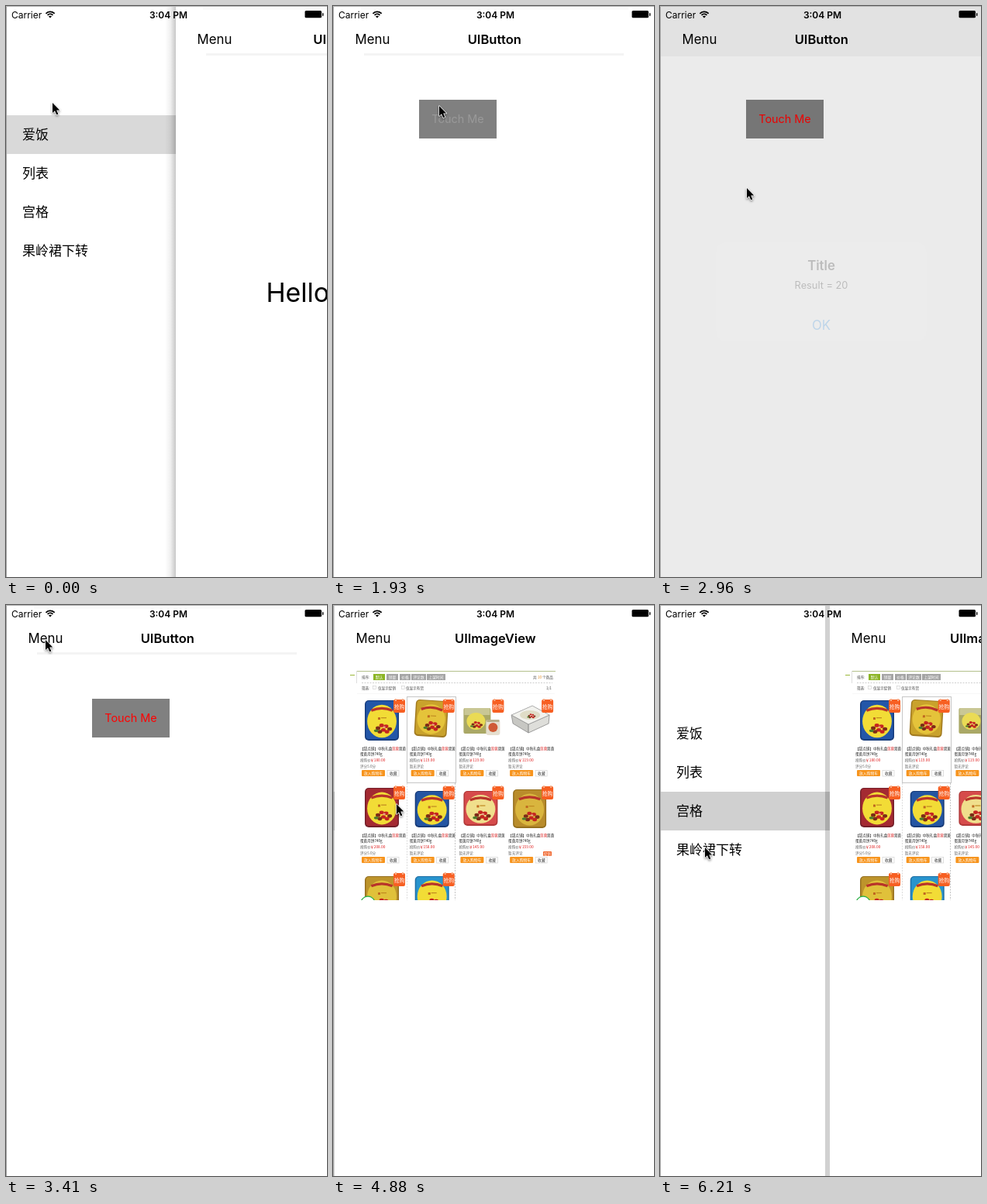
These frames come from a looping animation (414 px wide and 737 px high, 6350 ms). An HTML page with a canvas:

```html
<!DOCTYPE html>
<html lang="en">
<head>
<meta charset="utf-8">
<title>Drawer demo</title>
<style>
html, body { margin: 0; width: 100%; height: 100%; overflow: hidden; background: #fff; }
canvas { display: block; width: 414px; height: 737px; }
</style>
</head>
<body>
<canvas id="stage" width="414" height="737"></canvas>
<script>
const W = 414, H = 737, LOOP = 6350, STEP = 147.9, OPEN = 218;
const ctx = document.getElementById('stage').getContext('2d');
const LATIN = 'Inter, sans-serif';
const CJK = '"Noto Sans CJK SC", "Noto Sans CJK", sans-serif';

// Key points are [step, value...]
const CURSOR = [[0, 60, 125], [3, 76, 212], [7, 80, 216], [12, 135, 132], [13, 137, 129],
  [15, 150, 153], [17, 203, 400], [18, 208, 410], [20, 112, 235], [22, 52, 46], [24, 50, 44],
  [28, 80, 235], [29, 82, 257], [33, 82, 257], [36, 52, 46], [38, 50, 44], [41, 59, 290], [42, 58, 313]];
const DIM = [[13, 0], [14, .25], [15, .4], [18, .4], [19, .22], [20, .08], [21, 0]];
const TITLES = ['UILabel', 'UIButton', 'UIImageView'];
const MENU = ['爱饭', '列表', '宫格', '果岭裙下转'];

function sample(keys, k) {
  if (k <= keys[0][0]) return keys[0].slice(1);
  for (let i = 1; i < keys.length; i++) {
    const a = keys[i - 1], b = keys[i];
    if (k <= b[0]) {
      const u = (k - a[0]) / (b[0] - a[0]);
      return a.slice(1).map((v, j) => v + (b[j + 1] - v) * u);
    }
  }
  return keys[keys.length - 1].slice(1);
}

function drawerOffset(k) {
  const decay = from => OPEN * Math.exp(-1.75 * (k - from));
  if (k < 4) return OPEN;
  if (k < 23) return Math.round(decay(4));
  if (k < 30) return Math.round(OPEN - decay(23));
  if (k < 38) return Math.round(decay(30));
  return Math.round(OPEN - decay(38));
}

function rect(x, y, w, h, color) {
  ctx.fillStyle = color;
  ctx.fillRect(x, y, w, h);
}

function round(x, y, w, h, r, color) {
  ctx.fillStyle = color;
  ctx.beginPath();
  ctx.roundRect(x, y, w, h, r);
  ctx.fill();
}

function ellipse(x, y, rx, ry, color) {
  ctx.fillStyle = color;
  ctx.beginPath();
  ctx.ellipse(x, y, rx, ry, 0, 0, 7);
  ctx.fill();
}

function poly(points, color, line) {
  ctx.beginPath();
  points.forEach(p => ctx.lineTo(p[0], p[1]));
  ctx.closePath();
  ctx.fillStyle = color;
  ctx.fill();
  if (line) { ctx.strokeStyle = line; ctx.stroke(); }
}

function text(str, x, y, size, color = '#000', { weight = 400, align = 'left', font = LATIN } = {}) {
  ctx.font = `${weight} ${size}px ${font}`;
  ctx.textAlign = align;
  ctx.fillStyle = color;
  ctx.fillText(str, x, y);
}

const tiny = (str, x, y, color = '#444', size = 4.6) => text(str, x, y, size, color, { font: CJK });

function dashed(x1, y1, x2, y2, color = '#bbb') {
  ctx.setLineDash([2, 1.5]);
  ctx.lineWidth = .7;
  ctx.strokeStyle = color;
  ctx.beginPath();
  ctx.moveTo(x1, y1);
  ctx.lineTo(x2, y2);
  ctx.stroke();
  ctx.setLineDash([]);
}

function statusBar() {
  text('Carrier', 7, 16, 12);
  text('3:04 PM', 209.5, 16, 12, '#000', { weight: 600, align: 'center' });
  ctx.strokeStyle = '#000';
  ctx.lineWidth = 1.8;
  [7.6, 4.6].forEach(r => {
    ctx.beginPath();
    ctx.arc(57, 15, r, -Math.PI * .76, -Math.PI * .24);
    ctx.stroke();
  });
  poly([[57, 15.6], [54.9, 13.3], [57, 12.4], [59.1, 13.3]], '#000');
  round(385.5, 6, 21.5, 9.3, 1.5, '#000');
  round(408, 9, 1.4, 4, .7, '#000');
}

function menu(selected) {
  rect(0, 141 + selected * 50, W, 50, selected === 2 ? '#d0d0d0' : '#d9d9d9');
  MENU.forEach((label, i) => text(label, 21, 172 + i * 50, 17, '#000', { font: CJK }));
}

function fruit(x, y, s) {
  [[-6, 0], [-2, -3], [3, -2], [7, 1], [0, 2], [4, 4], [-4, 4]].forEach((p, i) =>
    ellipse(x + p[0] * s, y + p[1] * s, 2.6 * s, 2 * s, i % 3 ? '#c52420' : '#7d2b18'));
  ellipse(x - 8 * s, y + 3 * s, 2.5 * s, 1.5 * s, '#4c7b2b');
  ellipse(x + s, y - s, 1.5 * s, s, '#e8a08a');
}

function tin(x, y, w, h, color, edge, face = '#f2dc36') {
  round(x, y, w, h, 5, edge);
  round(x + 1.5, y + 1, w - 3, h - 3, 4, color);
  const cx = x + w / 2, cy = y + h * .52;
  ellipse(cx, cy, w * .43, h * .41, face);
  ctx.strokeStyle = '#b8342a';
  ctx.lineWidth = 3.2;
  ctx.beginPath();
  ctx.arc(cx, y + h * .2 + 35, 35, -Math.PI / 2 - .4, -Math.PI / 2 + .4);
  ctx.stroke();
  rect(cx - 5, cy - 5, 3, 3, '#c06a20');
  rect(cx - 1, cy - 5, 7, 1.2, '#c08a20');
  fruit(cx + 2, cy + h * .17, w / 38);
}

function paleBox(x, y) {
  round(x, y + 11, 35, 33, 2, '#aaa866');
  rect(x + 1, y + 11, 33, 9, '#c9c795');
  ellipse(x + 16, y + 28, 12, 11, '#eadb55');
  fruit(x + 17, y + 32, .8);
  round(x + 29, y + 26, 18, 20, 3, '#e5dfcf');
  ellipse(x + 38, y + 36, 6, 6, '#cf5a35');
  rect(x + 30, y + 26, 16, 3, '#b7ae8a');
}

function whiteBox(x, y) {
  ctx.lineWidth = .8;
  poly([[x - 2, y + 20], [x + 20, y + 32], [x + 20, y + 43], [x, y + 31]], '#c7c7c3', '#888');
  poly([[x + 20, y + 32], [x + 47, y + 20], [x + 46, y + 31], [x + 20, y + 43]], '#dededa', '#888');
  poly([[x - 2, y + 20], [x + 25, y + 8], [x + 47, y + 20], [x + 20, y + 32]], '#f2f2ee', '#999');
  ellipse(x + 22, y + 20, 13, 6, '#e0ddc7');
  fruit(x + 24, y + 21, .55);
}

const TINS = [
  (x, y) => tin(x, y + 1, 44, 52, '#2356a8', '#183d7d'),
  (x, y) => {
    ctx.save();
    ctx.translate(x + 22, y + 25);
    ctx.rotate(.06);
    tin(-21, -24, 42, 47, '#c9a22c', '#a17a20', '#e5c33a');
    ctx.restore();
  },
  paleBox,
  whiteBox,
  (x, y) => tin(x, y + 2, 44, 51, '#a42a32', '#74202a'),
  (x, y) => tin(x + 1, y + 6, 44, 47, '#2455a2', '#173b78'),
  (x, y) => tin(x, y + 6, 44, 45, '#d64b4b', '#b23939', '#f0df8c'),
  (x, y) => tin(x, y + 4, 43, 50, '#b98c2b', '#96701f', '#d9b53e'),
  (x, y) => tin(x, y + 4, 44, 50, '#bd942b', '#967021', '#e0c13a'),
  (x, y) => tin(x + 1, y + 4, 44, 50, '#2894ce', '#1f6fa5')
];
const PRICES = [180, 119, 119, 119, 208, 158, 145, 159];

function product(i) {
  const x = 40 + (i % 4) * 63.7, y = 122 + Math.floor(i / 4) * 112;
  TINS[i](x, y);
  round(x + 37, y, 15, 17, 2, '#f75f22');
  rect(x + 39, y - 1, 2, 3, '#f7b08c');
  rect(x + 48, y - 1, 2, 3, '#f7b08c');
  text('抢购', x + 44.5, y + 12, 6.8, '#fff', { align: 'center', font: CJK });
  if (i > 7) return;
  const tx = x - 6;
  tiny('【甜点铺】中秋礼盒', tx, y + 65, '#222');
  tiny('莲蓉', tx + 41, y + 65, '#d33');
  tiny('双黄', tx + 50, y + 65, '#222');
  tiny('蛋黄月饼740g', tx, y + 72, '#222');
  tiny('抢购价:', tx, y + 80, '#666');
  tiny('￥' + PRICES[i] + '.00', tx + 13, y + 80, '#e02020', 4.8);
  tiny(i % 4 ? '暂无评论' : '评分5.0分', tx, y + 88, '#666');
  round(x - 4, y + 91, 30, 8, 1, '#f7941d');
  tiny('放入购物车', x - 1, y + 97, '#fff', 4.8);
  ctx.lineWidth = .6;
  ctx.strokeStyle = '#ccc';
  ctx.strokeRect(x + 29, y + 91.5, 15, 7.5);
  tiny('收藏', x + 32, y + 97, '#333', 4.8);
}

function shopImage() {
  ctx.save();
  ctx.beginPath();
  ctx.rect(20, 84, 267, 297);
  ctx.clip();
  rect(21, 90, 6, 1, '#9bb83a');
  rect(29, 85, 257, 1, '#b4c08c');
  rect(29, 85, 1, 16, '#ddd');
  tiny('排序:', 36, 95);
  [[51, 15, '默认'], [68, 15, '销量'], [85, 14, '价格'], [100, 19, '评论数'], [120, 24, '上架时间']]
    .forEach(([x, w, label], i) => {
      rect(x, 89, w, 8, i ? '#a5a5a5' : '#8cb526');
      text(label, x + w / 2, 94.8, 4.8, '#fff', { align: 'center', font: CJK });
    });
  tiny('共', 257, 95);
  tiny('10', 263, 95, '#e08a20');
  tiny('个商品', 269, 95);
  dashed(36, 100.5, 282, 100.5);
  tiny('筛选:', 36, 108.5);
  ctx.lineWidth = .6;
  ctx.strokeStyle = '#ccc';
  ctx.strokeRect(50.5, 104.5, 4, 4);
  ctx.strokeRect(87.5, 104.5, 4, 4);
  tiny('仅显示促销', 57, 108.5);
  tiny('仅显示有货', 93, 108.5);
  tiny('1/1', 274, 109);
  rect(30, 114, 255, .5, '#eee');
  dashed(94.5, 230, 94.5, 381, '#ccc');
  dashed(156.5, 230, 156.5, 381, '#aaa');
  ctx.lineWidth = 1;
  ctx.strokeStyle = '#c6c6c6';
  ctx.strokeRect(94.5, 118.5, 63, 111);
  TINS.forEach((_, i) => product(i));
  round(270, 318, 11, 6, 1, '#f0642a');
  tiny('促销', 271, 322.8, '#fff', 4.4);
  ctx.strokeStyle = '#31b34a';
  ctx.lineWidth = 1.3;
  ctx.beginPath();
  ctx.arc(44, 385, 9, 0, 7);
  ctx.fillStyle = '#fff';
  ctx.fill();
  ctx.stroke();
  ctx.restore();
}

function panelShadow(edge, flat) {
  if (flat) return rect(edge - 6, 0, 6, H, 'rgba(0,0,0,.18)');
  const g = ctx.createLinearGradient(edge - 14, 0, edge, 0);
  g.addColorStop(0, 'rgba(0,0,0,0)');
  g.addColorStop(.5, 'rgba(0,0,0,.06)');
  g.addColorStop(1, 'rgba(0,0,0,.22)');
  rect(edge - 14, 0, 14, H, g);
}

function panel(page, offset, pressed, fading) {
  if (offset > 0) panelShadow(offset + 1, page === 2);
  ctx.save();
  ctx.translate(offset, 0);
  rect(1, 0, W, H, '#fff');
  if (fading) rect(1, 0, W, 65, '#f5f5f5');
  else if (page < 2) {
    rect(36, 1, 345, 4, '#fafafa');
    rect(40, 61, 335, 3, '#f4f4f4');
  }
  text('Menu', 28.6, 49, 16.8);
  text(TITLES[page], 208.3, 49, 16.5, '#000', { weight: 600, align: 'center' });
  if (page === 0) text('Hello World', 117.5, 382, 33.8);
  if (page === 1) {
    rect(111, 121, 100, 50, '#808080');
    text('Touch Me', 161, 151, 14.4, pressed ? '#999' : '#f00', { align: 'center' });
  }
  if (page === 2) shopImage();
  ctx.restore();
}

function alertBox(alpha, scale) {
  ctx.save();
  ctx.translate(208, 369);
  ctx.scale(scale, scale);
  ctx.translate(-208, -369);
  ctx.globalAlpha = alpha * alpha;
  round(72, 305, 272, 128, 13, '#f5f5f5');
  rect(72, 389, 272, 1, '#d6d6d6');
  ctx.globalAlpha = alpha;
  text('Title', 208, 341, 16.8, '#000', { weight: 600, align: 'center' });
  text('Result = 20', 208, 365, 12.8, '#000', { align: 'center' });
  text('OK', 208, 418, 16.8, '#0a7de0', { align: 'center' });
  ctx.restore();
}

function pointer(x, y) {
  ctx.save();
  ctx.translate(x, y);
  ctx.scale(.9, .9);
  ctx.shadowColor = 'rgba(0,0,0,.35)';
  ctx.shadowBlur = 3;
  ctx.shadowOffsetY = 1.5;
  ctx.lineWidth = 1.6;
  ctx.lineJoin = 'round';
  const arrow = [[0, 0], [0, 14.5], [3.3, 11.4], [5.8, 17], [8.2, 16], [5.8, 10.6], [10.3, 10.5]];
  poly(arrow, '#fff', '#fff');
  ctx.shadowColor = 'transparent';
  poly(arrow, '#000');
  ctx.restore();
}

function draw(ms) {
  const k = Math.floor((ms % LOOP + 8) / STEP);
  const page = k < 4 ? 0 : k < 30 ? 1 : 2;
  const [dim] = sample(DIM, k);
  rect(0, 0, W, H, '#fff');
  menu(page);
  panel(page, drawerOffset(k), k === 13, dim > 0 && dim < .4);
  statusBar();
  if (dim > 0) {
    rect(0, 0, W, H, `rgba(0,0,0,${dim})`);
    alertBox(dim / .4, k === 14 ? 1.07 : 1);
  }
  rect(0, 0, 1, H, '#a2a2a2');
  rect(0, 0, W, 1, '#b4b4b4');
  pointer(...sample(CURSOR, k));
}

const start = performance.now();
function loop() {
  draw(performance.now() - start);
  requestAnimationFrame(loop);
}
loop();
</script>
</body>
</html>
```
